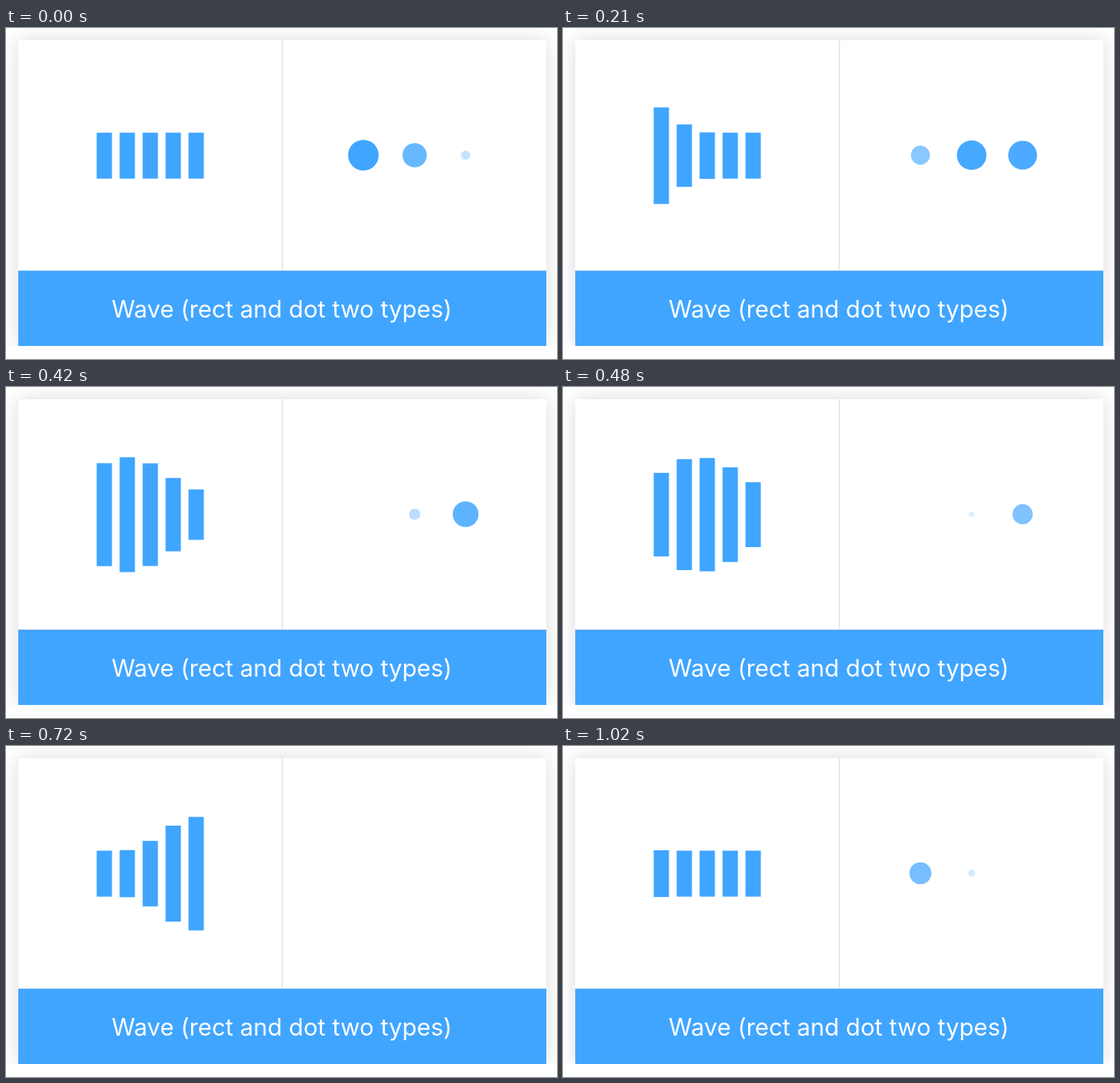
Recreate the animation shown at these times as an HTML page. Size 720 by 432 pixels, loop 1.05 s.

```html
<!DOCTYPE html>
<html lang="en">
<head>
<meta charset="utf-8">
<title>Wave loaders</title>
<style>
  html, body { margin: 0; width: 100%; height: 100%; overflow: hidden; background: #fff; }
  .stage { position: relative; width: 720px; height: 415px; overflow: hidden; background: #fff; }
  .card {
    position: absolute; left: 16px; top: 16px; width: 690px; height: 400px;
    background: #fff; box-shadow: 0 0 24px rgba(0, 0, 0, .14);
  }
  svg { position: absolute; left: 0; top: 0; }
  text { font: 400 31.2px Inter, "Liberation Sans", sans-serif; }
</style>
</head>
<body>
<div class="stage">
  <div class="card"></div>
  <svg width="720" height="432" fill="#40a5ff">
    <rect x="360.4" y="16" width="1.3" height="300" fill="#dedede"/>
    <rect x="16" y="316" width="690" height="1" fill="#cbdbe9"/>
    <rect x="16" y="317" width="690" height="99"/>
    <text x="360.5" y="377.5" text-anchor="middle" fill="#fff">Wave (rect and dot two types)</text>
    <g id="shapes"></g>
  </svg>
</div>
<script>
const LOOP = 1050, STEP = 30;
const BAR = { half: 325, period: 994, starts: [1, 100, 190, 277, 362] };
const DOT = { half: 470, period: 1185, peaks: [8, 148, 290], xs: [467, 534, 600.6] };

const shapes = document.getElementById('shapes');

function add(tag, attrs) {
  const el = document.createElementNS('http://www.w3.org/2000/svg', tag);
  set(el, attrs);
  shapes.append(el);
  return el;
}

function set(el, attrs) {
  for (const key in attrs) el.setAttribute(key, attrs[key]);
}

// cubic-bezier(.42, 0, .58, 1), solved by bisection
function easeInOut(x) {
  let lo = 0, hi = 1;
  for (let i = 0; i < 24; i++) {
    const s = (lo + hi) / 2, r = 1 - s;
    if (1.26 * s * r * r + 1.74 * s * s * r + s * s * s < x) lo = s;
    else hi = s;
  }
  return lo * lo * (3 - 2 * lo);
}

// Rises from 0 to 1 and back, then rests until the period ends
function pulse(time, half, period) {
  const u = ((time % period) + period) % period / half;
  return u >= 2 ? 0 : easeInOut(u < 1 ? u : 2 - u);
}

const bars = BAR.starts.map((_, i) => add('rect', { x: 118.5 + 30 * i, width: 20 }));
const dots = DOT.xs.map(cx => add('circle', { cx, cy: 166 }));

function draw(t) {
  bars.forEach((bar, i) => {
    // Bars that have not started yet wait at rest
    const time = Math.max(0, t - BAR.starts[i]);
    const height = 60 + 90 * pulse(time, BAR.half, BAR.period);
    set(bar, { y: 166.6 - height / 2, height });
  });
  dots.forEach((dot, i) => {
    const scale = pulse(t - DOT.peaks[i] + DOT.half, DOT.half, DOT.period);
    set(dot, { r: 20 * scale, opacity: scale });
  });
}

const begin = performance.now();

function tick() {
  const t = (performance.now() - begin) % LOOP;
  draw(Math.floor(t / STEP) * STEP);
  requestAnimationFrame(tick);
}

tick();
</script>
</body>
</html>
```
